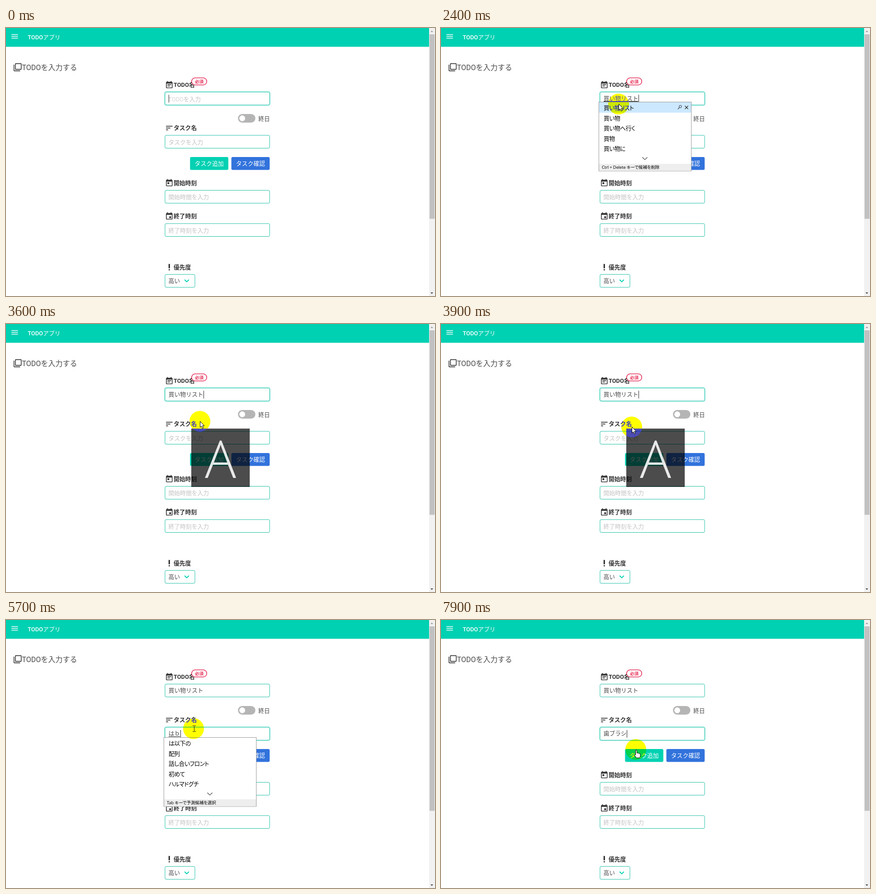
An HTML page that plays this animation: 947 px wide and 592 px high, repeating every 8000 ms.

```html
<!DOCTYPE html>
<html lang="ja">
<head>
<meta charset="utf-8">
<style>
html, body { margin: 0; width: 100%; height: 100%; overflow: hidden; background: #fff; }
svg { display: block; }
text { font: 12.8px Roboto, "Noto Sans CJK JP", "Noto Sans CJK", sans-serif; fill: #4a4a4a; white-space: pre; }
.title { font-size: 16px; }
.bar, .btn { fill: #fff; }
.bar { font-weight: 500; }
.label { font-weight: 700; fill: #363636; }
.badge { font-size: 9.6px; font-weight: 700; fill: #e8325c; text-anchor: middle; }
.btn { text-anchor: middle; }
.value, .hint { font-weight: 300; }
.hint { fill: #c3c3c3; }
.item, .foot { font-family: "Open Sans", "Noto Sans CJK JP", "Noto Sans CJK", sans-serif; fill: #000; font-feature-settings: "palt"; }
.item { letter-spacing: -.5px; }
.foot { font-size: 9.6px; letter-spacing: -.2px; }
.mode { font: 300 115px "Open Sans", sans-serif; fill: #fff; fill-opacity: .88; text-anchor: middle; }
.field { fill: #fff; stroke: #1fbfa6; }
.ring { fill: none; stroke: #00d1b2; stroke-opacity: .28; stroke-width: 3; }
.pointer { fill: #fff; stroke: #000; stroke-width: 1; stroke-linejoin: round; }
#light { mix-blend-mode: difference; }
</style>
</head>
<body>
<svg width="947" height="592" viewBox="0 0 947 592"><g id="page"></g><g id="live"></g><circle id="light" r="23" fill="#00f"/><g id="mouse"></g></svg>
<script>
const $ = id => document.getElementById(id);
const text = (cls, x, y, s) => `<text class="${cls}" x="${x}" y="${y}">${s}</text>`;
const rect = (x, y, w, h, attrs) => `<rect x="${x}" y="${y}" width="${w}" height="${h}" ${attrs}/>`;
const icon = (x, y, d, fill = '#363636') => `<path transform="translate(${x} ${y}) scale(.8)" fill="${fill}" d="${d}"/>`;
const line = (d, color, width) => `<path d="${d}" fill="none" stroke="${color}" stroke-width="${width}"/>`;
const box = (y, w = 231) => rect(351, y, w, 28.5, 'rx="3" class="field"');

const calendar = 'M19 3h-1V1h-2v2H8V1H6v2H5c-1.1 0-2 .9-2 2v14c0 1.1.9 2 2 2h14c1.1 0 2-.9 2-2V5c0-1.1-.9-2-2-2zm0 16H5V8h14z';
const icons = {
  menu: 'M3 6h18v2H3zm0 5h18v2H3zm0 5h18v2H3z',
  copies: 'M3 5H1v16c0 1.1.9 2 2 2h16v-2H3zM21 1H7c-1.1 0-2 .9-2 2v14c0 1.1.9 2 2 2h14c1.1 0 2-.9 2-2V3c0-1.1-.9-2-2-2zm0 16H7V3h14z',
  note: calendar + 'M7 10h10v2H7zm0 4h7v2H7z',
  sort: 'M3 6h18v2H3zm0 5h12v2H3zm0 5h6v2H3z',
  start: calendar + 'M7 10h5v5H7z',
  end: calendar + 'M12 12h5v5h-5z',
  alert: 'M10 3h4v12h-4zm0 16a2 2 0 1 0 4 0a2 2 0 1 0-4 0z'
};
const label = (y, name, s) => icon(350.8, y - 9.2, icons[name]) + text('label', 370, y + 4.8, s);
const button = (x, fill, s) => rect(x, 285, 84.5, 28.5, `rx="3" fill="${fill}"`) + text('btn', x + 42.3, 304, s);

$('page').innerHTML =
  rect(0, 0, 947, 592, 'fill="#fff"') +
  rect(0, 0, 934, 41.5, 'fill="#00d1b2"') +
  icon(9.6, 8.9, icons.menu, '#fff') + text('bar', 48, 25, 'TODOアプリ') +
  rect(934, 0, 13, 592, 'fill="#f1f1f1"') + rect(935, 14, 11, 407.5, 'fill="#c1c1c1"') +
  '<path d="M937 9h6l-3-3.5z" fill="#a3a3a3"/><path d="M937 584h6l-3 3.5z" fill="#505050"/>' +
  icon(16, 77, icons.copies) + text('title', 35.2, 92.5, 'TODOを入力する') +
  label(125.5, 'note', 'TODO名') +
  rect(409.8, 110.3, 33.4, 15.4, 'rx="7.7" fill="#fff" stroke="#e8325c" stroke-width="1.6"') +
  text('badge', 426.5, 121.7, '必須') +
  rect(512, 190, 38.5, 19, 'rx="9.5" fill="#b5b5b5"') + '<circle cx="521.5" cy="199.5" r="6.4" fill="#fff"/>' +
  text('value', 557, 205.3, '終日') +
  label(220.5, 'sort', 'タスク名') +
  button(406.3, '#00d1b2', 'タスク追加') + button(497.5, '#3273dc', 'タスク確認') +
  label(342, 'start', '開始時刻') + box(358.5) + text('hint', 358.5, 378.3, '開始時間を入力') +
  label(415.5, 'end', '終了時刻') + box(432) + text('hint', 358.5, 452, '終了時刻を入力') +
  label(528, 'alert', '優先度') + box(544.3, 66) + text('value', 358.5, 563.3, '高い') +
  line('M394.3 556l4.7 4.7l4.7-4.7', '#00d1b2', 2);

const tops = [141.5, 237], hints = ['TODOを入力', 'タスクを入力'];
const lists = {
  kai: ['買い物リスト', '開始時刻', '改修', '会社', '開発'],
  buy: ['買い物リスト', '買い物', '買い物へ行く', '買物', '買い物に'],
  ha: ['は以下の', '配列', '話し合いフロント', '初めて', 'ハルマドグチ'],
  hub: ['ハブ', '歯ブラシ', '歯ブラシを', '省く', '羽ばたく'],
  brush: ['歯ブラシ', 'ハブラシ', '歯ブラシを', '省く', '羽ばたく']
};
// start, field, text, candidate list, mode: 0 plain, 1 composing, 2 candidate chosen
const steps = [
  [0, 0, '', '', 0],
  [1100, 0, 'ｋ', '', 1], [1200, 0, 'か', 'kai', 1], [1300, 0, 'かい', 'kai', 1],
  [1700, 0, 'かいｍ', 'kai', 1], [1900, 0, 'かいも', 'buy', 1],
  [2000, 0, 'かいもｎ', 'buy', 1], [2100, 0, 'かいもの', 'buy', 1],
  [2400, 0, '買い物リスト', 'buy', 2], [2600, 0, '買い物リスト', '', 0],
  [4100, 1, '', '', 0],
  [5200, 1, 'ｈ', '', 1], [5300, 1, 'は', 'ha', 1], [5700, 1, 'はｂ', 'ha', 1],
  [5800, 1, 'はぶ', 'hub', 1], [5900, 1, 'はぶら', 'hub', 1],
  [6000, 1, 'はぶらｓ', 'brush', 1], [6100, 1, 'はぶらし', 'brush', 1],
  [6300, 1, '歯ブラシ', 'brush', 2], [6800, 1, '歯ブラシ', '', 0]
];
const path = [
  [100, 560, 288], [200, 478, 214], [300, 392, 168], [3300, 392, 168],
  [3500, 428, 215], [3700, 428, 215], [4100, 414, 240], [7500, 414, 240], [7900, 430, 286], [8000, 430, 286]
];

function popup(y, rows, chosen) {
  let s = rect(348.5, y + .5, 204, 152.5, 'fill="#fff" stroke="#999"');
  if (chosen) s += rect(349, y + 1, 203, 23, 'fill="#cce8ff"') +
    '<circle cx="528.3" cy="' + (y + 10.5) + '" r="2.7" fill="none" stroke="#222"/>' +
    line(`M526.3 ${y + 12.6}l-3.6 3.7M538.5 ${y + 9}l7 7m0-7l-7 7`, '#222', 1.1);
  rows.forEach((row, i) => s += text('item', 359, y + 18.4 + i * 22.45, row));
  return s + line(`M444.5 ${y + 122.5}l5.5 5.3l5.5-5.3`, '#333', 1.1) +
    rect(349, y + 137, 203, 15.5, 'fill="#eee"') +
    text('foot', 355, y + 148.2, chosen ? 'Ctrl + Delete キーで候補を削除' : 'Tab キーで予測候補を選択');
}

function pointAt(t) {
  const i = Math.max(1, path.findIndex(p => p[0] > t));
  const [a, ax, ay] = path[i - 1], [b, bx, by] = path[i], k = (t - a) / (b - a);
  return [ax + (bx - ax) * k, ay + (by - ay) * k];
}

const shapes = {
  arrow: '<path class="pointer" d="M.5 0v13.4l3-2.8l2.1 4.8l2.2-1l-2.1-4.6h4.2z"/>',
  beam: line('M-2 -6.5h2.5q1 0 1 1v11q0 1-1 1h-2.5M5 -6.5h-2.5q-1 0-1 1v11q0 1 1 1h2.5', '#222', 1),
  hand: '<path class="pointer" d="M-.5 12V3q0-2 1.4-2t1.4 2v5q2-1.2 2.8.4q2-.8 2.7.7q2.2-.4 2.2 1.8v3q0 2-1.5 4.6h-7.3q-1-2.3-4-5.5q-.8-2.6 2.3-1z"/>'
};

function draw(t) {
  const [since, active, value, list, mode] = steps.filter(s => s[0] <= t).pop();
  const values = active ? ['買い物リスト', value] : [value, ''];
  let s = '';
  tops.forEach((y, i) => {
    if (i === active) s += rect(350.5, y - .5, 232, 29.5, 'rx="3.5" class="ring"');
    s += box(y) + (values[i] ? text('value', 358.7, y + 18.3, values[i]) : text('hint', 358.5, y + 20, hints[i]));
  });
  const y = tops[active], end = 359 + 12.8 * value.length;
  if (mode) s += rect(359, y + 20, end - 359.5, mode === 2 ? 2 : 1, 'fill="#222"');
  if ((t - since) % 1000 < 500) s += rect(Math.round(end), y + 6, 1, 17, 'fill="#222"');
  if (list) s += popup(active ? 259 : 163, lists[list], mode === 2);
  const fade = Math.min(1, (t - 3300) / 200, (4200 - t) / 300);
  if (fade > 0) s += `<g opacity="${fade}">` + rect(409, 231, 129, 129, 'fill="#000" fill-opacity=".7"') + text('mode', 473.5, 339.5, 'A') + '</g>';
  $('live').innerHTML = s;

  const [mx, my] = pointAt(t), shown = t >= 100 ? 'visible' : 'hidden';
  const inField = tops.some(top => my >= top && my < top + 29);
  const onButton = my >= 285 && mx > 406 && mx < 582;
  $('light').setAttribute('cx', mx);
  $('light').setAttribute('cy', my);
  $('mouse').setAttribute('transform', `translate(${mx} ${my})`);
  $('mouse').innerHTML = shapes[onButton ? 'hand' : inField && !(list && !active) ? 'beam' : 'arrow'];
  $('light').style.visibility = $('mouse').style.visibility = shown;
}

let last = -1;
function frame() {
  const t = Math.floor(performance.now() % 8000 / 100) * 100;
  if (t !== last) draw(last = t);
  requestAnimationFrame(frame);
}
frame();
</script>
</body>
</html>
```
